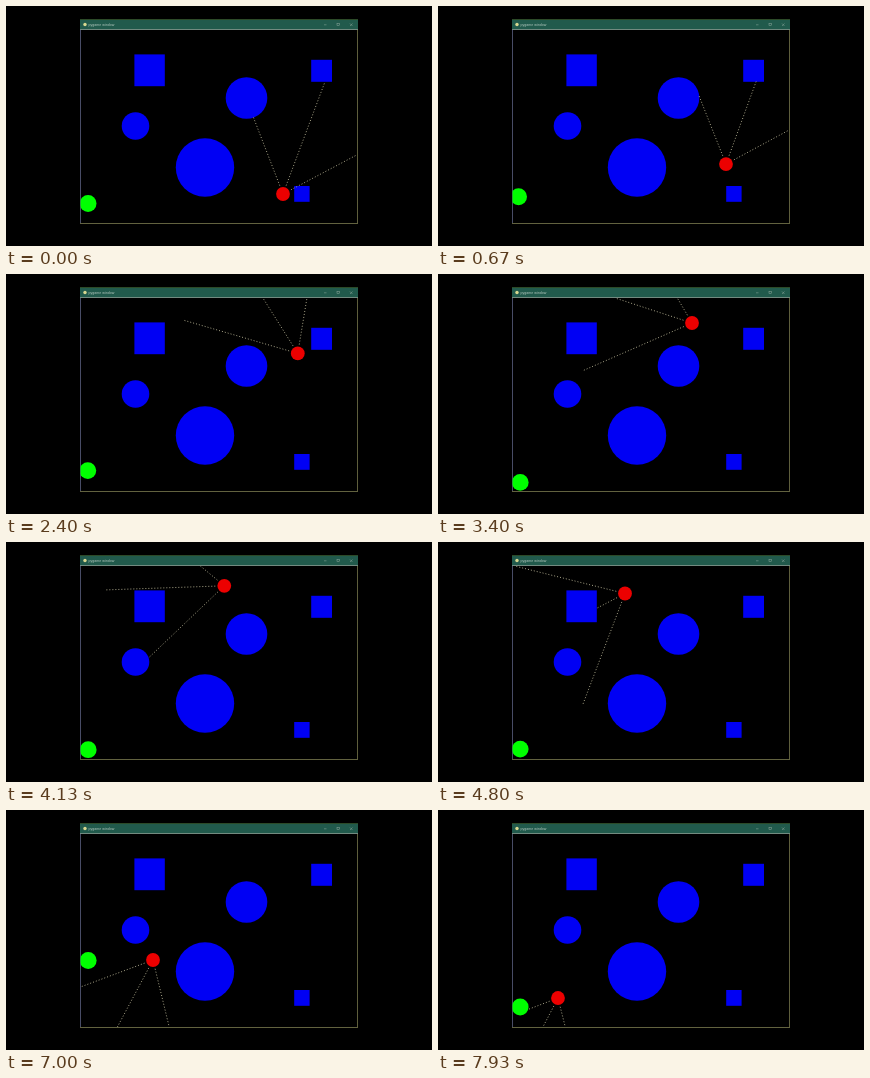
Animation of 426 by 240 pixels, one loop 8000 ms. Source, as an HTML page with a canvas:

```html
<!DOCTYPE html>
<html lang="en">
<head>
<meta charset="utf-8">
<title>Robot avoiding obstacles</title>
<style>
html, body { margin: 0; width: 100%; height: 100%; overflow: hidden; background: #000; }
canvas { display: block; width: 100%; height: 100%; }
</style>
</head>
<body>
<canvas id="stage" width="426" height="240"></canvas>
<script>
const ctx = document.getElementById('stage').getContext('2d');
const FPS = 15, STEPS = 120;
const DEG = Math.PI / 180;
const SPEED = 48, SPREAD = 41.6 * DEG;
const RAY_START = 9, BLIND = 18, RANGE = 118.5;
const ROOM = { left: 75, top: 24, right: 351.5, bottom: 217 };
const BLUE = '#0000f4';

const discs = [
  { x: 240.5, y: 92, r: 20.8 },
  { x: 129.5, y: 120, r: 13.8 },
  { x: 199, y: 161.5, r: 29.2 }
];
const blocks = [
  { x: 128.4, y: 48.4, w: 30.4, h: 31.8 },
  { x: 305.2, y: 53.8, w: 20.8, h: 22 },
  { x: 288.2, y: 180, w: 15.4, h: 15.8 }
];

// Waypoints: the robot drives through each one at a constant pace.
const robotPath = [
  { t: 0, x: 277, y: 188, heading: 290.5 },
  { t: 1.333, x: 299, y: 128.2, heading: 290.5 },
  { t: 3.4, x: 254, y: 49, heading: 198 },
  { t: 4.8, x: 187, y: 51.5, heading: 152.4 },
  { t: 5.733, x: 171, y: 92, heading: 95.4 },
  { t: 7, x: 147, y: 150, heading: 118 },
  { t: 7.933, x: 120, y: 188, heading: 117.5 }
];
// The ball bounces up and down along the left wall.
const ballPath = [
  { t: 0, y: 197.5 }, { t: 1.333, y: 184 }, { t: 3.4, y: 208.4 },
  { t: 5.733, y: 206.2 }, { t: 7, y: 150.5 }, { t: 7.933, y: 197 }
];

function segment(path, t) {
  const next = path.findIndex((p, i) => i > 0 && p.t > t);
  const i = next < 0 ? path.length - 1 : next;
  const a = path[i - 1], b = path[i], span = b.t - a.t;
  return { a, b, span, u: (t - a.t) / span };
}

function robotAt(t) {
  const { a, b, span, u } = segment(robotPath, t);
  const pull = SPEED * span;
  const axis = (key, trig) => {
    const d = b[key] - a[key];
    const m0 = pull * trig(a.heading * DEG), m1 = pull * trig(b.heading * DEG);
    const c2 = 3 * d - 2 * m0 - m1, c3 = m0 + m1 - 2 * d;
    return { pos: a[key] + u * (m0 + u * (c2 + u * c3)), vel: m0 + u * (2 * c2 + 3 * u * c3) };
  };
  const x = axis('x', Math.cos), y = axis('y', Math.sin);
  return { x: x.pos, y: y.pos, heading: Math.atan2(y.vel, x.vel) };
}

function ballAt(t) {
  const { a, b, u } = segment(ballPath, t);
  const dip = 4 * Math.exp(-(((t - 1.333) / 0.7) ** 2));
  return { x: 82.2 - dip, y: a.y + (b.y - a.y) * u, r: 8.4 };
}

function outside(x, y) {
  return x < ROOM.left || x > ROOM.right || y < ROOM.top || y > ROOM.bottom;
}

function blocked(x, y, ball) {
  return [...discs, ball].some(o => Math.hypot(x - o.x, y - o.y) < o.r) ||
    blocks.some(o => x > o.x && x < o.x + o.w && y > o.y && y < o.y + o.h);
}

function castRay(robot, c, s, ball) {
  for (let d = RAY_START; d < RANGE; d += 0.5) {
    const x = robot.x + c * d, y = robot.y + s * d;
    if (outside(x, y) || (d >= BLIND && blocked(x, y, ball))) return d;
  }
  return RANGE;
}

function disc({ x, y, r }, color) {
  ctx.fillStyle = color;
  ctx.beginPath();
  ctx.arc(x, y, r, 0, Math.PI * 2);
  ctx.fill();
}

function rect(x, y, w, h, color) {
  ctx.fillStyle = color;
  ctx.fillRect(x, y, w, h);
}

function line(x1, y1, x2, y2) {
  ctx.beginPath();
  ctx.moveTo(x1, y1);
  ctx.lineTo(x2, y2);
  ctx.stroke();
}

function drawWindow() {
  rect(0, 0, 426, 240, '#000');
  rect(74, 13, 278, 10, '#215a4c');
  rect(74, 13, 278, 1, '#2c4a28');
  rect(74, 23, 278, 1, '#728a80');
  rect(74, 24, 1, 194, '#484c66');
  rect(351, 24, 1, 194, '#5e5e3c');
  rect(74, 217, 278, 1, '#62623f');

  disc({ x: 79, y: 18.5, r: 1.7 }, '#d8d890');
  ctx.fillStyle = '#b4c8be';
  ctx.font = '3.6px "Liberation Sans", Arial, sans-serif';
  ctx.fillText('pygame window', 82.5, 20);

  ctx.strokeStyle = '#8fa89c';
  ctx.lineWidth = 0.5;
  line(318, 18.8, 320.5, 18.8);
  ctx.strokeRect(331, 17.3, 2.4, 2.4);
  line(344, 17.5, 346.5, 20);
  line(346.5, 17.5, 344, 20);
}

function drawRays(robot, ball) {
  ctx.strokeStyle = '#a8a488';
  ctx.lineWidth = 1;
  ctx.setLineDash([1, 2]);
  for (const side of [-1, 0, 1]) {
    const angle = robot.heading + side * SPREAD;
    const c = Math.cos(angle), s = Math.sin(angle);
    const end = castRay(robot, c, s, ball);
    line(robot.x + c * RAY_START, robot.y + s * RAY_START, robot.x + c * end, robot.y + s * end);
  }
  ctx.setLineDash([]);
}

function draw(t) {
  const robot = robotAt(t), ball = ballAt(t);
  drawWindow();
  ctx.save();
  ctx.beginPath();
  ctx.rect(74.5, 24, 276.5, 193);
  ctx.clip();
  for (const o of discs) disc(o, BLUE);
  for (const o of blocks) rect(o.x, o.y, o.w, o.h, BLUE);
  disc(ball, '#0f0');
  drawRays(robot, ball);
  disc({ x: robot.x, y: robot.y, r: 6.9 }, '#ec0000');
  ctx.restore();
}

function tick() {
  // the small offset absorbs step times rounded to 10 ms
  const step = Math.floor(performance.now() * FPS / 1000 + 0.06) % STEPS;
  draw(step / FPS);
  requestAnimationFrame(tick);
}
tick();
</script>
</body>
</html>
```
